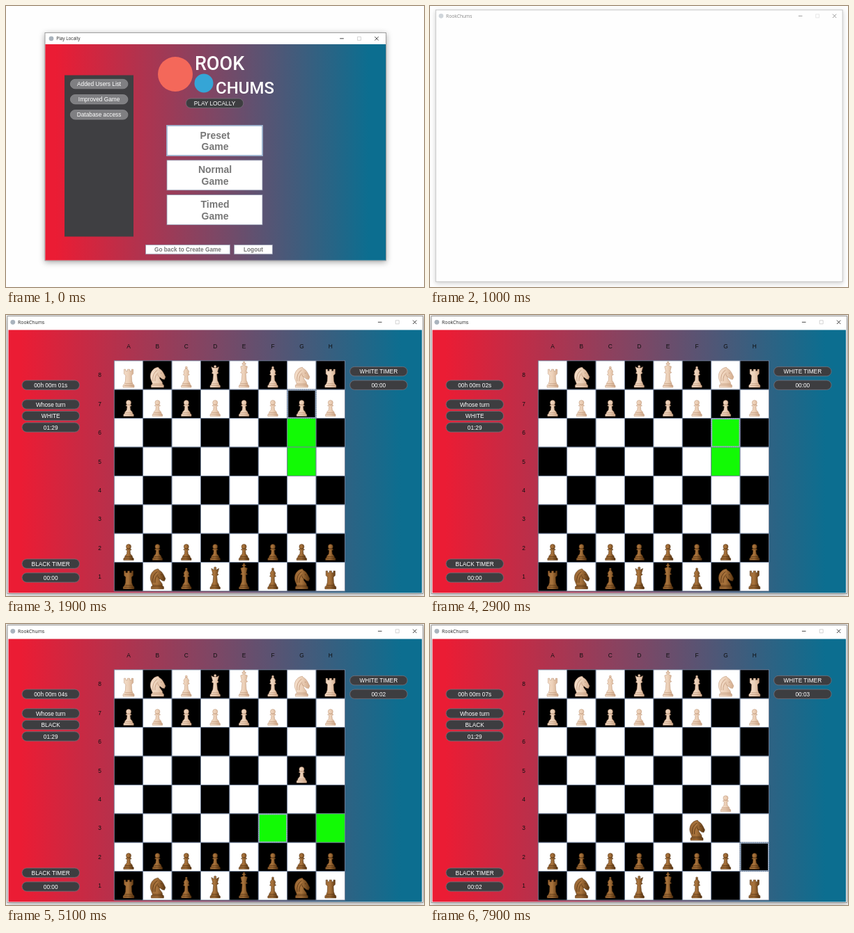
Recreate the animation shown at these times as an HTML page. Size 600 px wide and 404 px high, loop 8 s.

```html
<!DOCTYPE html>
<html lang="en">
<head>
<meta charset="utf-8">
<title>Chess game</title>
<style>
  html, body { margin: 0; width: 100%; height: 100%; overflow: hidden; background: #fefefe; }
  svg { display: block; width: 600px; height: 404px; }
  text { font-family: "Liberation Sans", Arial, sans-serif; }
  .title { font-family: "Open Sans", "Noto Sans", sans-serif; }
  .brand { font-family: Roboto, sans-serif; font-weight: 500; }
  .shadow { filter: drop-shadow(0 2px 4px rgba(0, 0, 0, .35)); }
</style>
</head>
<body>
<svg id="stage" viewBox="0 0 600 404">
  <defs>
    <linearGradient id="backdrop">
      <stop offset=".03" stop-color="#eb1c34"/>
      <stop offset=".5" stop-color="#7d4765"/>
      <stop offset=".95" stop-color="#0c6e90"/>
    </linearGradient>
    <linearGradient id="light">
      <stop offset="0" stop-color="#f5dfcb"/>
      <stop offset=".5" stop-color="#ecd0b8"/>
      <stop offset="1" stop-color="#d2ab8c"/>
    </linearGradient>
    <linearGradient id="dark">
      <stop offset="0" stop-color="#9a6734"/>
      <stop offset=".45" stop-color="#a8733c"/>
      <stop offset="1" stop-color="#57330f"/>
    </linearGradient>
  </defs>
  <g id="menu"></g>
  <g id="game"></g>
</svg>
<script>
const LOOP = 8000;
const CELL = 41.4, LEFT = 155.3, TOP = 65.8;
const FILES = 'ABCDEFGH';
const NS = 'http://www.w3.org/2000/svg';
const menu = document.getElementById('menu');
const game = document.getElementById('game');

function add(parent, tag, attrs, content) {
  const node = document.createElementNS(NS, tag);
  for (const key in attrs) node.setAttribute(key, attrs[key]);
  if (content !== undefined) node.textContent = content;
  parent.appendChild(node);
  return node;
}

function box(parent, x, y, width, height, fill, extra) {
  return add(parent, 'rect', { x, y, width, height, fill, ...extra });
}

function label(parent, x, y, content, size, fill = '#fff', extra) {
  return add(parent, 'text',
    { x, y, fill, 'font-size': size, 'text-anchor': 'middle', ...extra }, content);
}

function pill(parent, x, y, content, fill = '#3d3d40', stroke = '#77727c') {
  box(parent, x, y, 82.5, 13.4, fill, { rx: 6.7, stroke, 'stroke-width': .8 });
  return label(parent, x + 41.2, y + 9.8, content, 8.3);
}

function titleBar(parent, x, y, content, size, right, step) {
  add(parent, 'circle', { cx: x, cy: y, r: 3.4, fill: '#a9b3bd' });
  add(parent, 'text',
    { x: x + 7.3, y: y + 2.4, 'font-size': size, fill: '#222', class: 'title' }, content);
  const a = right - 2 * step, b = right - step;
  const stroke = { fill: 'none', 'stroke-width': .9 };
  add(parent, 'path', { d: `M${a - 2.8} ${y}h5.6`, stroke: '#333', ...stroke });
  add(parent, 'path', { d: `M${b - 2.5} ${y - 2.5}h5v5h-5z`, stroke: '#d0d0d0', ...stroke });
  add(parent, 'path', { d: `M${right - 2.7} ${y - 2.7}l5.4 5.4m0-5.4l-5.4 5.4`, stroke: '#333', ...stroke });
}

// Menu window
box(menu, 56, 38.5, 489.5, 327.5, '#fff', { class: 'shadow', stroke: '#8c8c8c', 'stroke-width': .8 });
titleBar(menu, 65, 46.8, 'Play Locally', 6.4, 532, 25);
box(menu, 56.4, 55, 488.7, 310.6, 'url(#backdrop)');
box(menu, 84, 99.5, 99, 232, '#3f3f42');
['Added Users List', 'Improved Game', 'Database access'].forEach((name, i) =>
  pill(menu, 92.4, 105.4 + 22.1 * i, name, '#7f7f82', '#8d8d90'));
add(menu, 'circle', { cx: 243, cy: 98, r: 25, fill: '#f4685a' });
add(menu, 'circle', { cx: 284, cy: 111, r: 13.5, fill: '#35a5d6' });
add(menu, 'text', { x: 271, y: 91.5, 'font-size': 27, fill: '#fff', class: 'brand' }, 'ROOK');
add(menu, 'text', { x: 301, y: 125.5, 'font-size': 24, fill: '#fff', class: 'brand' }, 'CHUMS');
pill(menu, 258.3, 133, 'PLAY LOCALLY');

const bold = { 'font-weight': 700 };
const buttons = ['Preset', 'Normal', 'Timed'].map((name, i) => {
  const y = 172 + 49.8 * i;
  const face = box(menu, 231, y, 137, 43, '#fff',
    { stroke: i ? '#8d93ac' : '#9fb6d2', 'stroke-width': i ? .8 : 1.8 });
  label(menu, 300, y + 18.6, name, 14, '#777', bold);
  label(menu, 300, y + 35.2, 'Game', 14, '#777', bold);
  return face;
});
[[200.5, 121, 'Go back to Create Game'], [327.5, 55, 'Logout']].forEach(([x, width, name]) => {
  box(menu, x, 343.4, width, 13.4, '#fff', { stroke: '#8d93ac', 'stroke-width': .7 });
  label(menu, x + width / 2, 352.8, name, 8.25, '#777', bold);
});

// Game window
box(game, 2, 1.5, 596.5, 399, '#fff', { class: 'shadow', stroke: '#999', 'stroke-width': 1 });
titleBar(game, 9.8, 10.3, 'RookChums', 6.8, 586.7, 25);
const content = add(game, 'g', {});
box(content, 3.5, 21.5, 593.5, 378, 'url(#backdrop)');
const elapsed = pill(content, 23, 94, '');
pill(content, 23, 121.8, 'Whose turn');
const turn = pill(content, 23, 138.3, '');
const countdown = pill(content, 23, 154.8, '');
pill(content, 23, 350.9, 'BLACK TIMER');
const blackTime = pill(content, 23, 370.8, '');
pill(content, 493.6, 74.4, 'WHITE TIMER');
const whiteTime = pill(content, 493.6, 94, '');

const place = square => [
  LEFT + FILES.indexOf(square[0]) * CELL,
  TOP + (8 - square[1]) * CELL
];

const cells = {};
for (let rank = 8; rank; rank--) {
  label(content, 134.5, TOP + (8.5 - rank) * CELL + 2.9, rank, 8.4, '#111');
  for (const file of FILES) {
    const square = file + rank;
    const [x, y] = place(square);
    const base = (FILES.indexOf(file) + rank) % 2 ? '#000' : '#fff';
    const node = box(content, x, y, CELL, CELL, base, { stroke: '#71819a', 'stroke-width': .9 });
    cells[square] = { node, base };
  }
}
[...FILES].forEach((file, i) => label(content, LEFT + (i + .5) * CELL, 47.5, file, 8.4, '#111'));
const hoverFrame = box(content, 0, 0, CELL - 1.4, CELL - 1.4, 'none', { stroke: '#9db0c8', 'stroke-width': 1.6 });
const hoverDots = box(content, 0, 0, CELL, CELL, 'none',
  { stroke: '#5f7390', 'stroke-width': .8, 'stroke-dasharray': '1.5 1.5' });

// Turned pieces: right-hand outline from base to top, mirrored
const turned = points => {
  const mirrored = points.map(([x, y]) => [-x, y]).reverse();
  return 'M' + [...points, ...mirrored].map(p => p.join(' ')).join('L') + 'Z';
};
const ball = (y, r) => `M${-r} ${y}a${r} ${r} 0 1 0 ${2 * r} 0a${r} ${r} 0 1 0 ${-2 * r} 0Z`;
const FOOT = [[7.2, 0], [7.2, -2.6], [5.6, -4], [5.2, -6]];
const shapes = {
  pawn: turned([...FOOT, [2.6, -9], [2, -14], [4.2, -15.2], [2, -16.6]]) + ball(-19.4, 3.5),
  rook: turned([[8, 0], [8, -3], [6, -5], [4.6, -9], [4.2, -17], [6.6, -19.5], [6.6, -26],
    [4.2, -26], [4.2, -23.5], [1.6, -23.5], [1.6, -26]]),
  bishop: turned([...FOOT, [2.6, -10], [2.1, -17], [4.6, -18.4], [3, -20], [3.8, -23], [1, -27.5]]) + ball(-28.6, 1.5),
  queen: turned([...FOOT, [3.2, -10], [2.4, -19], [4.8, -20.6], [3.4, -22.5], [5.4, -29.5], [2.4, -28]]) + ball(-30, 1.7),
  king: turned([...FOOT, [3.4, -10], [2.6, -20], [5.2, -21.4], [3.2, -23], [4.8, -30], [1, -31.5],
    [1, -33], [2.6, -33], [2.6, -34.6], [1, -34.6], [1, -37]]),
  knight: 'M-9 0V-3L-7 -5C-8 -9 -11 -13 -10 -18C-9 -24 -5 -28 1 -29L2.5 -27' +
    'C7 -25 9 -20 11.5 -15L10 -11.5L7 -12L3 -15C2 -11 8 -9 7 -5L9 -3V0Z'
};

const pieces = {};
function addPiece(square, kind, colour) {
  const node = add(content, 'g', {});
  const stroke = colour === 'light' ? '#b98f70' : '#4a2a0c';
  add(node, 'path', { d: shapes[kind], fill: `url(#${colour})`, stroke, 'stroke-width': .5 });
  const detail = kind === 'knight'
    ? 'M-9 -3H9M-7 -5H7M-6.5 -9Q-8 -20 0 -25M-3.5 -9Q-4 -17 1 -21M4.5 -20.5h1.8M3 -15Q0 -16 .5 -19'
    : 'M-6.5 -2.6H6.5M-4.8 -5.2H4.8';
  add(node, 'path', { d: detail, fill: 'none', stroke, 'stroke-width': .7 });
  pieces[square] = node;
}
['rook', 'knight', 'bishop', 'queen', 'king', 'bishop', 'knight', 'rook'].forEach((kind, i) => {
  addPiece(FILES[i] + 8, kind, 'light');
  addPiece(FILES[i] + 7, 'pawn', 'light');
  addPiece(FILES[i] + 2, 'pawn', 'dark');
  addPiece(FILES[i] + 1, kind, 'dark');
});

// Moments of the story, in ms
const PRESS = 650, CLOSE = 800, OPEN = 900, SHOW = 1150;
const MOVE_1 = 3700, MOVE_2 = 5700, MOVE_3 = 6900;

// Tracks of [start, value]: the latest one reached applies
const hovers = [[0, ''], [1400, 'G7'], [2800, 'G6'], [3300, 'G5'], [3800, 'G1'],
  [4700, 'F3'], [5850, 'G5'], [6600, 'G4'], [7200, ''], [7700, 'H2']];
const presses = [[0, ''], [1600, 'G7'], [1700, ''], [MOVE_1 - 100, 'G5'], [MOVE_1, ''],
  [4050, 'G1'], [4150, ''], [MOVE_2 - 100, 'F3'], [MOVE_2, ''],
  [6100, 'G5'], [6300, ''], [MOVE_3 - 100, 'G4'], [MOVE_3, '']];
const options = [[0, ''], [1700, 'G6 G5'], [MOVE_1, ''], [4150, 'F3 H3'], [MOVE_2, ''],
  [6300, 'G4'], [MOVE_3, '']];
const turns = [[0, 'WHITE'], [MOVE_1, 'BLACK'], [MOVE_2, 'WHITE'], [MOVE_3, 'BLACK']];
const countdowns = [[0, '01:30'], [1850, '01:29'], [2950, '01:28'], [4050, '01:29'],
  [5150, '01:28'], [6250, '01:29']];
const whiteTimes = [[0, '00:00'], [MOVE_1, '00:02'], [MOVE_3, '00:03']];
const blackTimes = [[0, '00:00'], [MOVE_2, '00:02']];
const paths = {
  G7: [[0, 'G7'], [MOVE_1, 'G5'], [MOVE_3, 'G4']],
  G1: [[0, 'G1'], [MOVE_2, 'F3']]
};

const at = (track, t) => track.filter(([start]) => start <= t).pop()[1];
const clamp = v => Math.max(0, Math.min(1, v));

function zoom(node, cx, cy, scale, opacity) {
  node.setAttribute('transform', `translate(${cx} ${cy}) scale(${scale}) translate(${-cx} ${-cy})`);
  node.setAttribute('opacity', opacity);
}

function render(t) {
  const closing = clamp((t - CLOSE) / 150);
  zoom(menu, 301, 202, 1 - .1 * closing, 1 - closing);
  buttons[0].setAttribute('fill', t >= PRESS ? '#b8cfe5' : '#fff');

  const left = 1 - clamp((t - OPEN) / 250);
  zoom(game, 300, 201 + 40 * left ** 3 * .1, 1 - .1 * left ** 3, t < OPEN ? 0 : 1 - left ** 1.5);
  content.setAttribute('visibility', t >= SHOW ? 'visible' : 'hidden');

  elapsed.textContent = `00h 00m 0${Math.max(0, Math.floor((t - 70) / 1080))}s`;
  turn.textContent = at(turns, t);
  countdown.textContent = at(countdowns, t);
  whiteTime.textContent = at(whiteTimes, t);
  blackTime.textContent = at(blackTimes, t);

  const pressed = at(presses, t), open = at(options, t).split(' ');
  for (const square in cells) {
    const { node, base } = cells[square];
    node.setAttribute('fill',
      square === pressed ? '#b5d1e8' : open.includes(square) ? '#12fa05' : base);
  }

  const hover = at(hovers, t);
  const [hx, hy] = hover ? place(hover) : [-100, -100];
  hoverFrame.setAttribute('transform', `translate(${hx + .7} ${hy + .7})`);
  hoverDots.setAttribute('transform', `translate(${hx} ${hy})`);

  for (const start in pieces) {
    const [x, y] = place(paths[start] ? at(paths[start], t) : start);
    pieces[start].setAttribute('transform', `translate(${x + CELL / 2} ${y + 38.3})`);
  }
}

const started = performance.now();
function tick() {
  render((performance.now() - started) % LOOP);
  requestAnimationFrame(tick);
}
tick();
</script>
</body>
</html>
```
